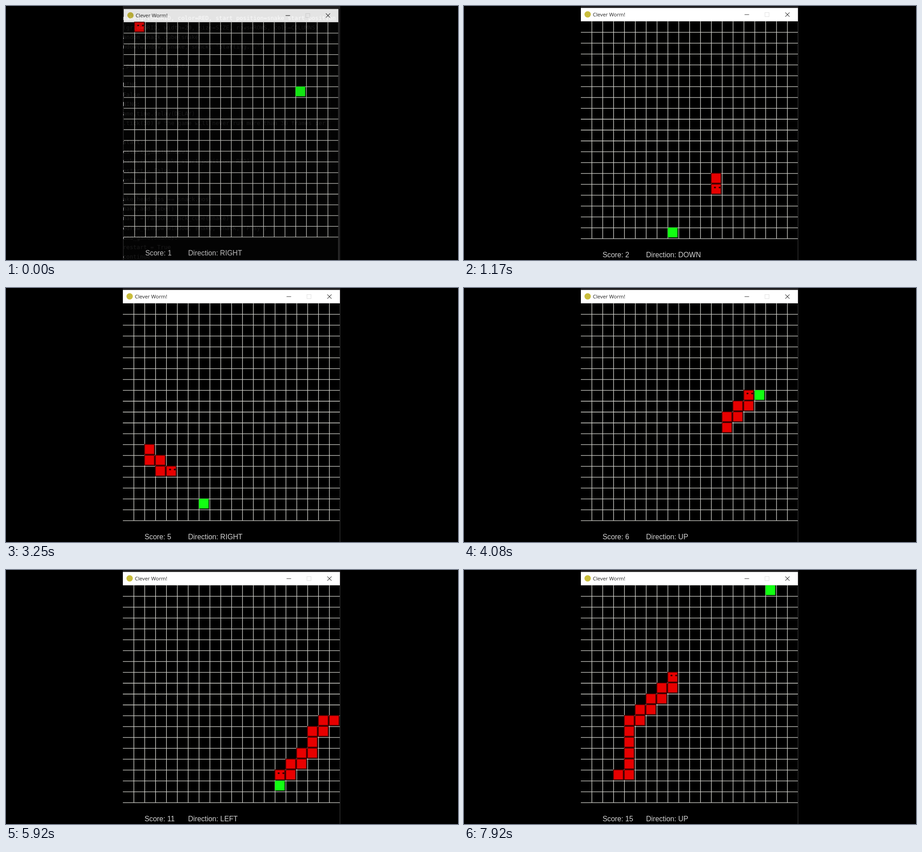
Animation, 998 px wide and 561 px high, one loop 8 s. Source, as an HTML page:

```html
<!DOCTYPE html>
<html lang="en">
<head>
<meta charset="utf-8">
<title>Clever Worm!</title>
<style>
  html, body { margin: 0; width: 100%; height: 100%; overflow: hidden; background: #000; }
  svg { display: block; width: 100vw; height: 100vh; }
  .code { font: 12.6px "DejaVu Sans Mono", monospace; fill: #ddd; white-space: pre; }
  .title { font: 11.4px "Open Sans", sans-serif; fill: #222; }
  .status { font: 15.8px "Liberation Sans", Arial, sans-serif; fill: #d2d2d2; }
</style>
</head>
<body>
<svg viewBox="0 0 998 561">
  <defs><clipPath id="stage"><rect x="258" width="480" height="561"/></clipPath></defs>
  <g clip-path="url(#stage)">
    <rect x="258" width="480" height="561" fill="#1f1e1f"/>
    <g id="code" class="code"></g>
    <g id="window">
      <rect x="258" y="33" width="479.5" height="535" fill="#000"/>
      <path id="grid" fill="none" stroke="#d6d6d0" stroke-width="1.3"/>
      <path d="M737.4 34V568" stroke="#444" stroke-width="1"/>
      <rect x="258" y="4.3" width="479.3" height="29.5" fill="#fff"/>
      <circle cx="273" cy="18.5" r="7" fill="#c9bd3c"/>
      <text class="title" x="284.5" y="23">Clever Worm!</text>
      <g fill="none" stroke-width="1.1">
        <path d="M619.5 19H629.5M709.5 14.3L718.8 23.6M718.8 14.3L709.5 23.6" stroke="#333"/>
        <rect x="664.5" y="14.5" width="9" height="9" stroke="#e2e2e2"/>
      </g>
      <path id="food" fill="#12ff12"/>
      <path id="snake" fill="#e80000" stroke="#560000" stroke-width="1.7"/>
      <g id="eyes" fill="#2a0000">
        <ellipse cx="8.3" cy="7.2" rx="2.4" ry="1.8"/><ellipse cx="18.8" cy="7.2" rx="2.4" ry="1.8"/>
      </g>
      <text id="score" class="status" x="306" y="555"></text>
      <text id="direction" class="status" x="402" y="555"></text>
    </g>
  </g>
</svg>
<script>
const LOOP = 8000, OPENING = 100, SIZE = 20;
const LEFT = 258, TOP = 34, CELL = 23.98;
const $ = id => document.getElementById(id);

// Equal gains are settled by this order.
const DIRECTIONS = [['LEFT', -1, 0], ['UP', 0, -1], ['DOWN', 0, 1], ['RIGHT', 1, 0]];
const FOODS = [
  [16, 6], [8, 19], [13, 13], [0, 2], [7, 18], [16, 8], [1, 11], [6, 11],
  [19, 9], [17, 14], [14, 18], [11, 6], [9, 14], [0, 19], [17, 0]
];
// Time in ms, moves made by then.
const PACE = [[0, 0], [1170, 34], [2420, 70], [4080, 118], [5080, 146], [6830, 197], [7920, 229], [8000, 231]];

const CODE = [
  'nake(grid=GRID, color=RED, start_position=snake_start_position',
  '      (grid=GRID, width=20, size=SIZE, rows=ROWS, cols=COLUMNS)',
  'andom_snack_cube(snake)',
  'ndow(window, snake, snack, "Starting...")',
  '',
  '_path(snack, snake)',
  '',
  'NING',
  'False',
  'NING:',
  'ame.time.delay(DELAY)',
  '.tick(30)  # the game will never run more than 30 frames per',
  '',
  'start:',
  'estart_game(window)',
  'nake.reset(snake_start_position, RED)',
  'estart = False',
  'ontinue',
  '',
  'ake.head.pos == snack.pos:',
  'nake.add_cube()',
  'nack = random_snack_cube(snake)',
  'edraw_window(window, snake, snack, "Play")',
  ' end_game(snake):',
  '   restart = True',
  '   continue'
];

const same = ([ax, ay], [bx, by]) => ax === bx && ay === by;
const inside = ([x, y]) => x >= 0 && y >= 0 && x < SIZE && y < SIZE;
const distance = ([ax, ay], [bx, by]) => (ax - bx) ** 2 + (ay - by) ** 2;

// The snake always steps to the free neighbour nearest to the food.
function play(moves) {
  let snake = [[1, 0]], eaten = 0, direction = 'RIGHT';
  const states = [{ snake, eaten, direction }];
  for (let i = 0; i < moves; i++) {
    const [x, y] = snake[0], food = FOODS[eaten];
    const options = DIRECTIONS
      .map(([name, dx, dy]) => ({ name, cell: [x + dx, y + dy] }))
      .filter(({ cell }) => inside(cell) && !snake.some(part => same(part, cell)))
      .sort((a, b) => distance(a.cell, food) - distance(b.cell, food));
    const { name, cell } = options[0];
    const grows = same(cell, food);
    snake = [cell, ...(grows ? snake : snake.slice(0, -1))];
    if (grows) eaten++;
    direction = name;
    states.push({ snake, eaten, direction });
  }
  return states;
}

function movesAt(time) {
  const i = PACE.findIndex(([end]) => time < end);
  const [t0, m0] = PACE[i - 1], [t1, m1] = PACE[i];
  return Math.floor(m0 + (m1 - m0) * (time - t0) / (t1 - t0) + 0.3);
}

const corner = ([x, y]) => [LEFT + x * CELL, TOP + y * CELL];
const square = cell => {
  const [x, y] = corner(cell);
  return `M${x} ${y - 0.3}h21.6v21.7h-21.6z`;
};

function drawStatic() {
  let lines = '';
  for (let i = 1; i <= SIZE; i++) {
    const [x, y] = corner([i, i]);
    if (i < SIZE) lines += `M${x + 0.4} ${TOP}V${TOP + SIZE * CELL}`;
    lines += `M${LEFT} ${y + 0.2}H${LEFT + SIZE * CELL}`;
  }
  $('grid').setAttribute('d', lines);
  CODE.forEach((line, i) => {
    const text = document.createElementNS('http://www.w3.org/2000/svg', 'text');
    text.setAttribute('x', 258);
    text.setAttribute('y', 31 + i * 21.07);
    text.textContent = line;
    $('code').append(text);
  });
}

function drawOpening(time) {
  const p = Math.min(1, time / OPENING), rest = 1 - p;
  $('window').setAttribute('opacity', 0.88 + 0.12 * p);
  $('window').setAttribute('transform',
    `translate(${4.97 * rest} ${2.39 * rest}) scale(${1 - 0.0115 * rest})`);
  $('code').setAttribute('visibility', p < 1 ? 'visible' : 'hidden');
}

const states = play(PACE[PACE.length - 1][1] + 1);

function draw(time) {
  const { snake, eaten, direction } = states[movesAt(time)];
  drawOpening(time);
  $('food').setAttribute('d', square(FOODS[eaten]));
  $('snake').setAttribute('d', snake.map(square).join(''));
  $('eyes').setAttribute('transform', `translate(${corner(snake[0])})`);
  $('score').textContent = `Score: ${eaten + 1}`;
  $('direction').textContent = `Direction: ${direction}`;
}

const start = performance.now();
function tick() {
  draw((performance.now() - start) % LOOP);
  requestAnimationFrame(tick);
}
drawStatic();
tick();
</script>
</body>
</html>
```
